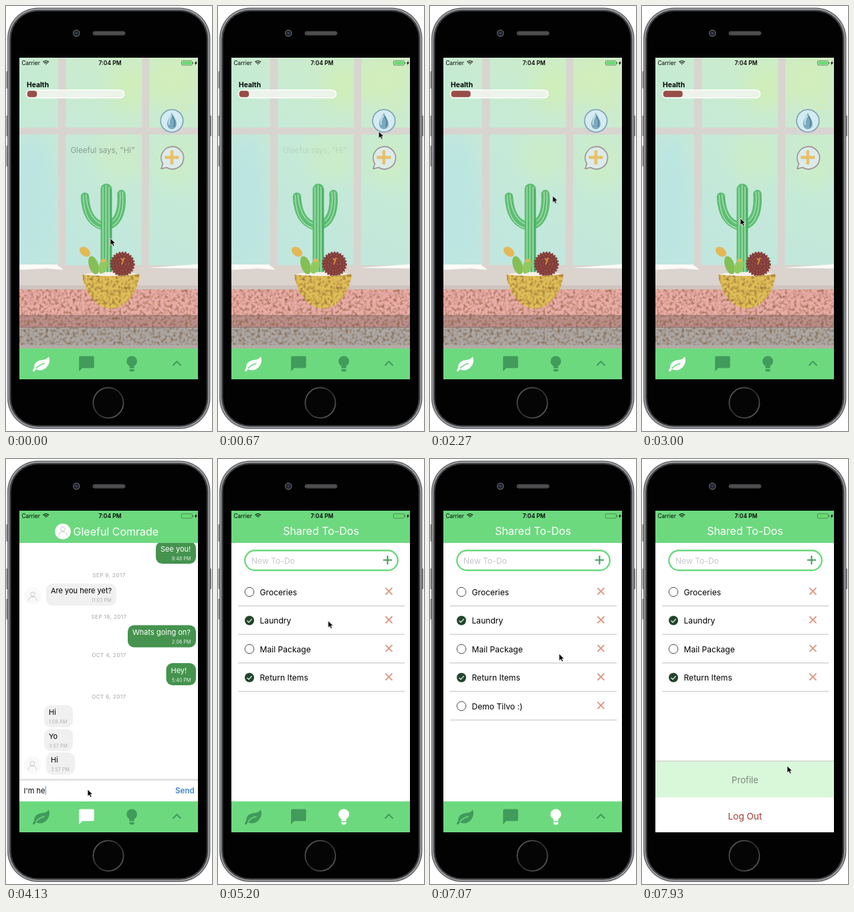
Recreate the animation shown at these times as an HTML page. Size 308x633 px, loop 8000 ms.

```html
<!DOCTYPE html>
<html lang="en">
<head>
<meta charset="utf-8">
<title>Plant companion app</title>
<style>
html, body { margin: 0; width: 100%; height: 100%; overflow: hidden; background: #fff; }
svg { display: block; width: 100vw; height: 100vh; font-family: Inter, "Liberation Sans", sans-serif; }
.anim { animation: 8s linear infinite; }
.swap { animation-timing-function: step-end; }
.mid { text-anchor: middle; }
.end { text-anchor: end; }
.date { font-size: 7.9px; font-weight: 500; letter-spacing: .5px; fill: #b0b0b0; text-anchor: middle; }
.msg { font-size: 11px; }
.time { font-size: 7px; letter-spacing: .1px; }
.item { font-size: 12.1px; }

#plant { animation-name: plant; }
#chat { animation-name: chat; }
#todo { animation-name: todo; }
@keyframes plant { 0% { opacity: 1 } 42.5%, 100% { opacity: 0 } }
@keyframes chat { 0% { opacity: 0 } 42.5% { opacity: 1 } 60.5%, 100% { opacity: 0 } }
@keyframes todo { 0% { opacity: 0 } 60.5%, 100% { opacity: 1 } }

.tab { color: #419b5b; }
#leafTab { animation-name: leafTab; }
#chatTab { animation-name: chatTab; }
#bulbTab { animation-name: bulbTab; }
@keyframes leafTab { 0% { color: #fff } 42.5%, 100% { color: #419b5b } }
@keyframes chatTab { 0% { color: #419b5b } 42.5% { color: #fff } 60.5%, 100% { color: #419b5b } }
@keyframes bulbTab { 0% { color: #419b5b } 60.5%, 100% { color: #fff } }

#says { animation-name: says; }
@keyframes says { 0%, 4% { opacity: .8 } 10%, 100% { opacity: 0 } }
#health { animation-name: health; }
@keyframes health { 0%, 11.5% { width: 14.5px } 16%, 100% { width: 29px } }
#water { animation-name: water; }
@keyframes water { 0%, 10% { opacity: 1 } 11%, 12.3% { opacity: .25 } 14.5%, 100% { opacity: 1 } }
#plus { animation-name: plus; }
@keyframes plus { 0%, 17.3% { opacity: 1 } 18.4%, 20.4% { opacity: .2 } 22.5%, 100% { opacity: 1 } }
#drops { animation-name: drops; }
@keyframes drops {
  0%, 12.5% { transform: translateY(-107px); opacity: 0 }
  14.5% { opacity: 1 }
  22% { opacity: 1 }
  24.5%, 100% { transform: translateY(86px); opacity: 0 }
}
#list { animation-name: list; }
@keyframes list { 0%, 56.75% { transform: none } 58.75%, 100% { transform: translateY(-40px) } }
#sent { animation-name: sent; }
@keyframes sent { 0% { opacity: 0 } 56.75%, 100% { opacity: 1 } }
#send { animation-name: send; }
@keyframes send { 0% { opacity: 0 } 49.1% { opacity: 1 } 56.75%, 100% { opacity: 0 } }
#added { animation-name: added; }
@keyframes added { 0% { opacity: 0 } 82% { opacity: 1 } 92.6%, 100% { opacity: 0 } }
#menu { animation-name: menu; }
@keyframes menu {
  0%, 95.2% { transform: translateY(108px); animation-timing-function: ease-out }
  98%, 100% { transform: none }
}
#pointer { animation-name: pointer; animation-timing-function: ease-in-out; }
@keyframes pointer {
  0%, 2.5% { transform: translate(156px, 346px) }
  10%, 13% { transform: translate(249px, 170px) }
  17%, 22% { transform: translate(247px, 224px) }
  33%, 37.5% { transform: translate(147px, 316px) }
  41.6%, 43.8% { transform: translate(120px, 533px) }
  46.6%, 53.5% { transform: translate(122px, 492px) }
  56%, 57% { transform: translate(266px, 491px) }
  59.4%, 62.5% { transform: translate(189px, 530px); animation-timing-function: ease-in }
  65% { transform: translate(165px, 242px); animation-timing-function: ease-out }
  66.6%, 77.5% { transform: translate(130px, 154px) }
  80.3%, 82.5% { transform: translate(253px, 150px) }
  88.3%, 89.5% { transform: translate(193px, 290px) }
  91.7%, 92.8% { transform: translate(255px, 364px) }
  94.6%, 95.5% { transform: translate(255px, 530px) }
  99%, 100% { transform: translate(217px, 457px) }
}
</style>
</head>
<body>
<svg viewBox="0 0 308 633" preserveAspectRatio="none">
<defs>
  <clipPath id="screenClip"><rect x="20" y="77" width="266.8" height="478.5"/></clipPath>
  <clipPath id="listClip"><rect x="20" y="124.5" width="267.5" height="352"/></clipPath>
  <clipPath id="skyClip"><rect x="20" y="77" width="268" height="312"/></clipPath>
  <linearGradient id="sky" x1=".8" x2=".35" y2="1">
    <stop stop-color="#cdecc8"/><stop offset=".45" stop-color="#c6ead6"/><stop offset="1" stop-color="#c0e6df"/>
  </linearGradient>
  <linearGradient id="ring" x2="1" y2="1">
    <stop stop-color="#6a6a6a"/><stop offset=".5" stop-color="#2b2b2b"/><stop offset="1" stop-color="#666"/>
  </linearGradient>
  <filter id="soft" x="-50%" y="-50%" width="200%" height="200%"><feGaussianBlur stdDeviation="14"/></filter>
  <filter id="grain" x="0" y="0" width="100%" height="100%" color-interpolation-filters="sRGB">
    <feTurbulence type="fractalNoise" baseFrequency=".22" numOctaves="2" seed="4"/>
    <feColorMatrix values="0 0 0 0 .45  0 0 0 0 .3  0 0 0 0 .15  1.6 0 0 0 -.7"/>
    <feComposite in2="SourceAlpha" operator="in" result="specks"/>
    <feMerge><feMergeNode in="SourceGraphic"/><feMergeNode in="specks"/></feMerge>
  </filter>
  <path id="drop" d="M0-10C2-5 6.5-1 6.5 4A6.5 6.5 0 0 1-6.5 4C-6.5-1-2-5 0-10Z"/>
  <g id="person" fill="none" stroke="#c9c9c9">
    <circle cy="-2.5" r="3.3"/><path d="M-6 7C-6 2-3 1.5 0 1.5S6 2 6 7"/>
  </g>
  <path id="cross" d="M-5-5L5 5M5-5L-5 5" stroke="#dc9a86" stroke-width="1.8" fill="none"/>
  <rect id="bar" x="20" y="77" width="268" height="48" fill="#6dd97f"/>
</defs>

<!-- phone body -->
<g fill="#77797c">
  <rect x=".6" y="97" width="4" height="26" rx="1.2"/><rect x=".6" y="163" width="4" height="31" rx="1.2"/>
  <rect x=".6" y="208" width="4" height="31" rx="1.2"/><rect x="303" y="163" width="4" height="31" rx="1.2"/>
</g>
<rect x="2" y="2.5" width="303.5" height="627.5" rx="46" fill="#66686b"/>
<rect x="3.5" y="4" width="300.5" height="624.5" rx="44.5" fill="#a0a2a5"/>
<rect x="5.2" y="5.7" width="297.1" height="621.1" rx="42.8" fill="#3f4042"/>
<rect x="7.6" y="8" width="292.3" height="616.5" rx="40.5" fill="#020202"/>
<circle cx="105.3" cy="40.5" r="4.6" fill="#1b1d22" stroke="#6b6d72" stroke-width="1.2"/>
<circle cx="105.3" cy="40.5" r="2" fill="#343d60"/>
<rect x="130" y="38" width="48" height="5.2" rx="2.6" fill="#3e3f41" stroke="#626365" stroke-width=".8"/>
<path d="M133 40.6H176" stroke="#777" stroke-width="1.5" stroke-dasharray="1 1"/>
<circle cx="153" cy="591" r="22.6" fill="#050505" stroke="url(#ring)" stroke-width="1.8"/>

<g clip-path="url(#screenClip)">
  <rect x="20" y="77" width="268" height="480" fill="#fff"/>

  <g id="plant" class="anim swap">
    <rect x="20" y="77" width="268" height="320" fill="url(#sky)"/>
    <g clip-path="url(#skyClip)"><g filter="url(#soft)">
      <ellipse cx="40" cy="290" rx="30" ry="100" fill="#bce5e2"/>
      <ellipse cx="40" cy="130" rx="22" ry="40" fill="#c5ebd3"/>
      <ellipse cx="185" cy="120" rx="30" ry="35" fill="#cfeeba"/>
      <ellipse cx="170" cy="225" rx="35" ry="35" fill="#cbecc8"/>
      <ellipse cx="250" cy="110" rx="36" ry="35" fill="#d1eebb"/>
      <ellipse cx="255" cy="235" rx="30" ry="35" fill="#cbedc6"/>
    </g></g>
    <path d="M258 157l9-9 11-8M265 150l8 5M268 146l2-7" stroke="#e8e29a" stroke-width="1.2" stroke-dasharray="2 1.5" fill="none"/>
    <path d="M78 77H89.5V390H78ZM20 181H288V191.5H20ZM203.5 77H214.5L213.5 390H202.5Z" fill="#d8d5d0"/>
    <path d="M20 386H288V424H20Z" fill="#dad3ce"/>
    <path d="M20 385H76L86 393 60 391 20 393ZM212 390L288 384.5V391Z" fill="#fbfaf7"/>
    <path d="M20 416H288V423H20Z" fill="#cfc5c0"/>
    <g filter="url(#grain)">
      <path d="M20 422H288V462H20Z" fill="#eaaca6"/>
      <path d="M20 461H288V479H20Z" fill="#bb8f8b"/>
      <path d="M20 478H288V511H20Z" fill="#aca7a4"/>
    </g>
    <path d="M20 461H288M20 478.5H288" stroke="#927571"/>
    <path d="M20 505H288V511H20Z" fill="#b4aaa5"/>

    <g fill="none" stroke-linecap="round">
      <g stroke="#5cbd73">
        <path d="M150 273V402" stroke-width="17"/>
        <path d="M118 284C119 304 125 322 144 327.5" stroke-width="12.5"/>
        <path d="M172.5 280C174.500 304 168 320 156 326" stroke-width="12.5"/>
      </g>
      <g stroke="#a9e0ae" stroke-width="1.4">
        <path d="M145 270V396M149.5 267V398M154 270V398"/>
        <path d="M115.500 282C116 306 123 325 141 330.500M119.500 281C121 302 127 317 141 324"/>
        <path d="M170.500 277C172 301 167 315 160 320M174.500 277C177 304 170 321 160 327"/>
      </g>
      <path d="M157 273V398" stroke="#439f60" stroke-width="1.2"/>
    </g>
    <path d="M117 400C126 395 188 395 197 400L194 405H120Z" fill="#f4f1e8"/>
    <ellipse cx="118" cy="366" rx="9" ry="6.3" fill="#e3b856" transform="rotate(38 118 366)"/>
    <ellipse cx="131" cy="386" rx="7" ry="14" fill="#84bf55" transform="rotate(-18 131 386)"/>
    <ellipse cx="145" cy="388" rx="6.5" ry="11" fill="#92c95e" transform="rotate(22 145 388)"/>
    <ellipse cx="146" cy="379" rx="4" ry="2.5" fill="#e3b75a"/>
    <circle cx="174" cy="384.5" r="17" fill="#843e3a"/>
    <g fill="none" stroke="#a9645c" stroke-width="1.3">
      <circle cx="174" cy="384.5" r="17.5" stroke="#843e3a" stroke-width="2.5" stroke-dasharray="2.5 2"/>
      <circle cx="174" cy="384.5" r="14" stroke-dasharray="1.2 3.4"/>
      <circle cx="174" cy="384.5" r="9.5" stroke-dasharray="1.5 2.6"/>
      <circle cx="174" cy="384.5" r="5" stroke-dasharray="1.2 3"/>
    </g>
    <path d="M172 376l3 3 2-4M175 380l-2 5" stroke="#e0a43d" stroke-width="1.6" fill="none"/>
    <path d="M114.500 400C140 403 175 403 199.500 399C199 422 181 450.500 157 450.500S115.500 422 114.500 400Z" fill="#e0be57" filter="url(#grain)"/>

    <text x="31" y="121" font-size="10.3" font-weight="700">Health</text>
    <rect x="30.7" y="125.2" width="146" height="11.6" rx="5.8" fill="#f2f5f0" fill-opacity=".85" stroke="#fff" stroke-width="1.5"/>
    <rect id="health" class="anim" x="31.7" y="126.2" width="14.5" height="9.6" rx="4" fill="#984d48"/>
    <text id="says" class="anim mid" x="144.5" y="219" font-size="11.6" fill="#788a82">Gleeful says, "Hi"</text>

    <g id="water" class="anim">
      <circle cx="248" cy="171" r="16.8" fill="#d3ebf1" stroke="#7ca0b2" stroke-width="1.6"/>
      <use href="#drop" transform="translate(248 171) scale(1.08 1.2)" fill="#7ba9bd"/>
      <path d="M247.500 163C244.500 168 242.500 172 244 177" stroke="#bcdde6" stroke-width="2.2" fill="none"/>
      <path d="M249 164C252 170 254 174 251 180" stroke="#4f839d" stroke-width="1.8" fill="none"/>
    </g>
    <g id="plus" class="anim">
      <path d="M232 242.500L234.500 235A16.800 16.800 0 1 1 240 240.500Z" fill="#dcebe9" stroke="#9a9196" stroke-width="1.6" stroke-linejoin="round"/>
      <path d="M248 215V236M237.500 225.500H258.500" stroke="#e8c069" stroke-width="4.5"/>
    </g>
    <g id="drops" class="anim" fill="#4a86c8">
      <use href="#drop" transform="translate(141.7 202) scale(.92)"/>
      <use href="#drop" transform="translate(173 210.500)"/>
      <use href="#drop" transform="translate(157.3 239) scale(1.22)"/>
    </g>
  </g>

  <g id="chat" class="anim swap">
    <rect x="20" y="77" width="268" height="480" fill="#fff"/>
    <g clip-path="url(#listClip)"><g id="list" class="anim"></g></g>
    <use href="#bar"/>
    <circle cx="85" cy="108" r="11.8" fill="#fff"/>
    <use href="#person" x="85" y="107"/>
    <text x="100.5" y="113.5" font-size="16" fill="#fff">Gleeful Comrade</text>
    <path d="M20 477.700H288" stroke="#dedede" stroke-width="2.4"/>
    <text x="26.5" y="497.5" class="msg"><tspan id="chatText"></tspan><tspan id="chatCaret" fill="#4078d8" dx="-1">|</tspan></text>
    <text id="send" class="anim swap" x="253" y="498" font-size="11.6" font-weight="600" fill="#3f84d2">Send</text>
  </g>

  <g id="todo" class="anim swap">
    <rect x="20" y="77" width="268" height="480" fill="#fff"/>
    <use href="#bar"/>
    <text class="mid" x="154" y="113" font-size="16" fill="#fff">Shared To-Dos</text>
    <rect x="40.3" y="136.3" width="228.5" height="29.5" rx="14.7" fill="#fff" stroke="#6dd97f" stroke-width="2.4"/>
    <path d="M253.500 144V157M247 150.500H260" stroke="#419b5b" stroke-width="2"/>
    <text id="hint" class="item" x="50" y="155.5" fill="#c6c6cc">New To-Do</text>
    <text class="item" x="50" y="155.5"><tspan id="todoText"></tspan><tspan id="todoCaret" fill="#4078d8" dx="-1">|</tspan></text>
    <g id="rows"></g>
  </g>

  <!-- status bar -->
  <g>
    <text x="23.5" y="87.5" font-size="8.4">Carrier</text>
    <g fill="none" stroke="#000" stroke-width="1.2">
      <path d="M55.500 83.500A6 6 0 0 1 64 83.500M57.200 85.300A3.600 3.600 0 0 1 62.300 85.300"/>
      <path d="M58.800 86.300H60.700L59.750 87.800Z" fill="#000" stroke="none"/>
    </g>
    <text class="mid" x="155.5" y="87.5" font-size="8.5" font-weight="600">7:04 PM</text>
    <rect x="262.4" y="81.6" width="16" height="6.6" rx="1.5" fill="none" stroke="#4b6850" stroke-width=".7"/>
    <rect x="263.4" y="82.6" width="14" height="4.6" rx=".8" fill="#67dc70"/>
    <path d="M279.500 83.700V86.200" stroke="#4b6850"/>
    <path d="M284.800 81.500L281.800 85.500H283.600L282.700 88.500 286 84.300H284.200Z"/>
  </g>

  <!-- tab bar -->
  <rect x="20" y="510" width="268" height="47" fill="#6dd97f"/>
  <g id="leafTab" class="anim swap tab">
    <path d="M63.500 522.500C61 526.500 57 527 52.500 527.500C45.500 528.500 41.500 533 42.300 539C40.800 540.500 40 542 40 543C40 544.500 41.500 545 42.500 544L45 541C47 542.500 51 543 54.500 542C61 540 65.500 533 65 527C65 525 64.500 523.500 63.500 522.500Z" fill="currentColor"/>
    <path d="M45 540C48 536 52 533.500 57.500 532.500" stroke="#6dd97f" stroke-width="1.7" fill="none"/>
  </g>
  <g id="chatTab" class="anim swap tab">
    <path d="M111 521.500H130Q131.700 521.500 131.700 523.500V537.300Q131.700 539.300 130 539.300H114L109.200 544.300V523.500Q109.200 521.500 111 521.500Z" fill="currentColor"/>
  </g>
  <g id="bulbTab" class="anim swap tab">
    <path d="M184.500 539.500V536.300A8 8 0 1 1 191.700 536.300V539.500ZM184.500 541H191.700V542.500Q191.700 544.500 188 544.500T184.500 542.500Z" fill="currentColor"/>
  </g>
  <path d="M249.500 535.500L255.500 529.500 261.500 535.500" fill="none" stroke="#419b5b" stroke-width="2"/>

  <g id="menu" class="anim">
    <rect x="20" y="449" width="268" height="3" fill="#d4dcd4"/>
    <rect x="20" y="451" width="268" height="53.5" fill="#d9f8da"/>
    <rect x="20" y="504" width="268" height="53" fill="#fff"/>
    <text class="mid" x="154" y="483" font-size="13.2" fill="#7a877b">Profile</text>
    <text class="mid" x="154" y="537" font-size="13.6" fill="#a63a2f">Log Out</text>
  </g>
</g>

<g id="pointer" class="anim">
  <path d="M0 0V10.500L2.500 8.300 4.300 12 6.200 11.100 4.500 7.600H7.800Z" stroke="#fff" stroke-width=".8"/>
</g>
</svg>

<script>
const $ = id => document.getElementById(id);

const date = (y, s) => `<text class="date" x="154" y="${y}">${s}</text>`;
const avatar = (x, y) => `<circle cx="${x}" cy="${y}" r="13" fill="#f9f9f9"/><use href="#person" x="${x}" y="${y}"/>`;

function bubble(x, y, w, text, time, mine) {
  const right = mine || w > 60;
  return `<rect x="${x}" y="${y}" width="${w}" height="33" rx="9.5" fill="${mine ? '#45934f' : '#f0f0f0'}"/>
    <text class="msg" x="${x + 7}" y="${y + 14.5}" fill="${mine ? '#fff' : '#000'}">${text}</text>
    <text class="time ${right ? 'end' : ''}" x="${right ? x + w - 7.5 : x + 7}" y="${y + 27.5}"
      fill="${mine ? '#e4f2e5' : '#b0b0b0'}">${time}</text>`;
}

$('list').innerHTML =
  bubble(224, 123, 60, 'See you!', '9:48 PM', true) +
  date(175.5, 'SEP 9, 2017') + avatar(40, 204) +
  bubble(60, 185.5, 105, 'Are you here yet?', '11:03 PM') +
  date(237.5, 'SEP 18, 2017') +
  bubble(182, 247.5, 102, 'Whats going on?', '2:06 PM', true) +
  date(294.5, 'OCT 4, 2017') +
  bubble(239.5, 304, 44.5, 'Hey!', '5:40 PM', true) +
  date(356.5, 'OCT 6, 2017') +
  bubble(57, 366.5, 43, 'Hi', '1:08 AM') +
  bubble(57, 402, 43, 'Yo', '3:57 PM') + avatar(39.5, 456) +
  bubble(60, 437, 43, 'Hi', '3:57 PM') +
  `<g id="sent" class="anim swap">${bubble(222, 477, 62, "I'm here!", '7:04 PM', true)}</g>`;

function row(text, i, done) {
  const y = 198 + i * 42.5;
  const mark = done
    ? `<circle cx="47" cy="${y}" r="7" fill="#23452c"/><path d="M43.5 ${y + .3}l2.5 2.5 4.7-5" fill="none" stroke="#d5ecd9" stroke-width="1.3"/>`
    : `<circle cx="47" cy="${y}" r="6.8" fill="#fff" stroke="#4a4a4a"/>`;
  return `${mark}<text class="item" x="62.5" y="${y + 4.5}">${text}</text>
    <use href="#cross" x="255.5" y="${y - 1}"/>
    <path d="M30 ${y + 20.8}H279" stroke="#d3d3d3" stroke-width="1.6"/>`;
}

const task = 'Demo Tilvo :)';
$('rows').innerHTML =
  row('Groceries', 0) + row('Laundry', 1, true) + row('Mail Package', 2) + row('Return Items', 3, true) +
  `<g id="added" class="anim swap">${row(task, 4)}</g>`;

// Typed text between start and end, empty outside
function typed(text, t, start, end, perChar) {
  return t < start || t >= end ? '' : text.slice(0, 1 + Math.floor((t - start) / perChar));
}

let origin;
function tick(now) {
  origin ??= now;
  const t = (now - origin) % 8000;
  $('chatText').textContent = typed("I'm here!", t, 3925, 4540, 38);
  $('chatCaret').style.opacity = t > 3700 && t < 4800 ? 1 : 0;
  const todo = typed(task, t, 5465, 6560, 60);
  $('todoText').textContent = todo;
  $('hint').style.opacity = todo ? 0 : 1;
  $('todoCaret').style.opacity = t > 5400 && t < 6560 ? 1 : 0;
  requestAnimationFrame(tick);
}
requestAnimationFrame(tick);
</script>
</body>
</html>
```
